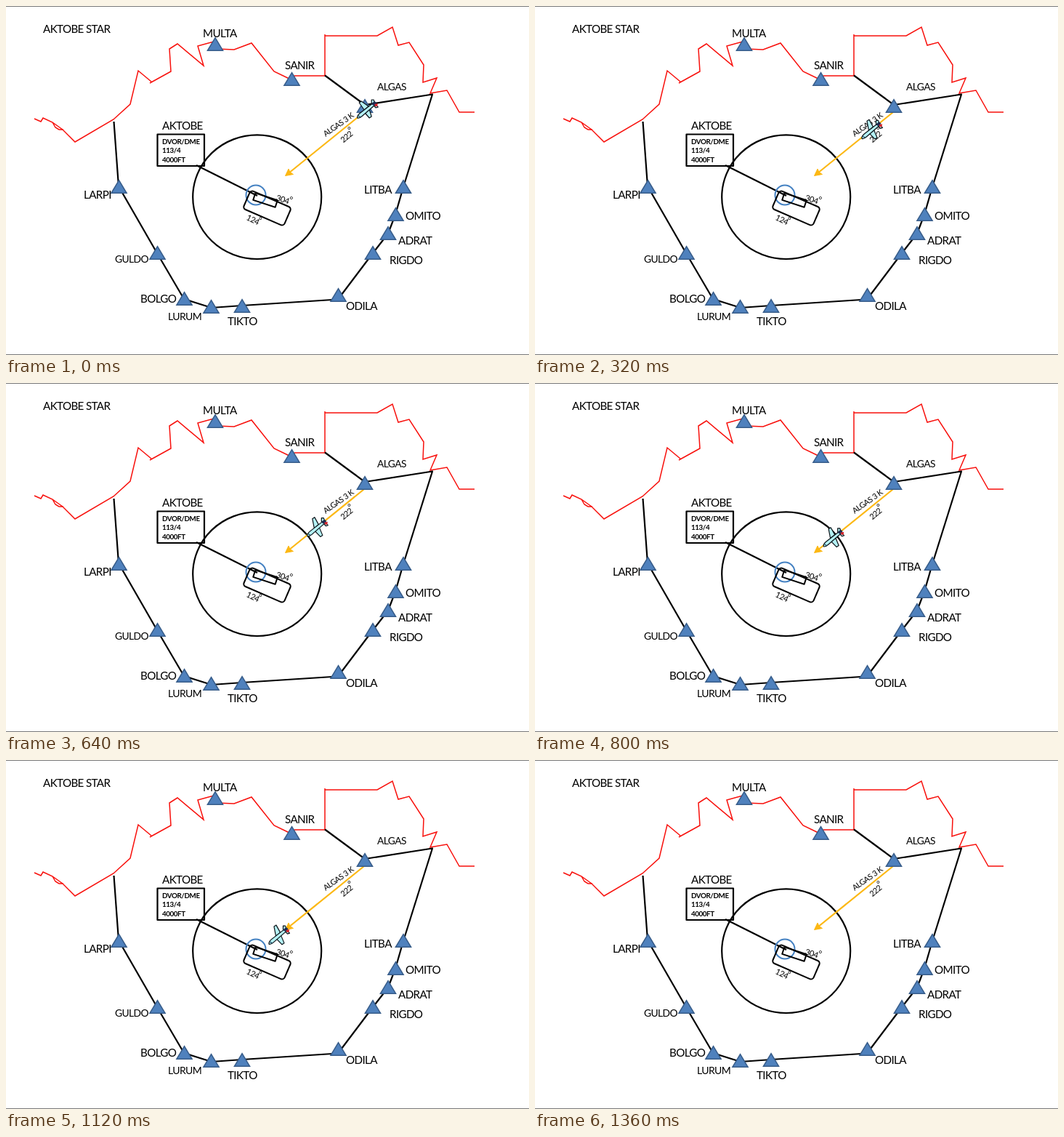
These frames come from a looping animation (720x480 px, 1.44 s). An HTML page:

```html
<!DOCTYPE html>
<html lang="en">
<head>
<meta charset="utf-8">
<title>Arrival chart</title>
<style>
html, body { margin: 0; width: 100%; height: 100%; overflow: hidden; background: #fff; }
svg { display: block; width: 100vw; height: 100vh; }
text { font-family: Lato, Inter, sans-serif; letter-spacing: -.042em; }
.line { fill: none; stroke: #000; stroke-width: 2.2; stroke-linejoin: round; }
.thin { stroke-width: 2; }
.red { fill: none; stroke: #f8100c; stroke-width: 1.5; }
.gold { fill: #fcb814; stroke: #fcb814; stroke-width: 2.2; }
.fix { fill: #4f81bd; stroke: #385d8a; stroke-width: 1.6; }
.skin { fill: #b4f1f4; stroke: #0b1218; stroke-width: 1.2; stroke-linejoin: round; }
</style>
</head>
<body>
<svg viewBox="0 0 720 480">
  <path d="M0 .5H720M0 479.5H720" stroke="#777"/>
  <path class="red" d="M39 155L48 159 51 154 64 160 68 167 73 170 79 170M64 160L78 170 95 187 148 156 171 135 182 89 200 104M198 106L227 90 225 59 236 52 272 82 264 55 286 49M290 59L314 60 338 51 369 90 392 101 397 96H439V39M439 41H511L532 29 540 54 555 50 575 81 574 105 593 99 584 120 607 116 624 146H645"/>
  <path class="line" d="M148.5 159L155 248 208 340 245 403 283 415 325 412 457 403.500 505 340 526 313 536 287 547 249 587 121.500 494 136 439 95.500"/>
  <ellipse class="line" cx="345.7" cy="262.7" rx="88.5" ry="85.3"/>
  <rect class="line" x="208.5" y="176.5" width="64.5" height="43.5"/>
  <path class="line" d="M262 219L346 261"/>
  <circle cx="344" cy="260" r="13.5" fill="none" stroke="#4481c2" stroke-width="2"/>
  <rect class="line thin" x="-30.5" y="-13.7" width="61" height="27.4" rx="4" transform="translate(359.5 278) rotate(23.5)"/>
  <rect class="line thin" x="-16" y="-5" width="32" height="10" transform="translate(357 267) rotate(18)"/>
  <path class="gold" d="M493 146L389 230"/>
  <path class="gold" style="stroke-width:1" d="M384.500 233.500L389 224 391 228.500 395.500 231.500Z"/>
  <g id="fixes"></g>
  <g id="labels"></g>
  <g id="plane">
    <path class="skin" id="wings"/>
    <path class="skin" d="M6 -7L6 -12 9 -12 11 -6 15 -2 12 -1Z"/>
    <path class="skin" d="M-13.5 13Q-14 10 -10 6.500L10 -9 12 -6 -7 10.500Q-11 14 -13.5 13Z"/>
    <path d="M6 -6L10 -10 13 -8 9 -4Z" fill="#1c2b52"/>
    <path d="M10 -6L14.5 -7 14 -3 11 -3Z" fill="#d3222a"/>
    <path d="M-12 10L-9 12" stroke="#24506b" stroke-width="1.3"/>
  </g>
</svg>
<script>
const NS = "http://www.w3.org/2000/svg";
const $ = id => document.getElementById(id);
const STEP = 80, STEPS = 18;

function add(parent, tag, attrs, text) {
  const el = document.createElementNS(NS, tag);
  for (const k in attrs) el.setAttribute(k, attrs[k]);
  if (text) el.textContent = text;
  $(parent).append(el);
}

function label(text, x, y, size = 15.2, turn = 0, weight = 400) {
  add("labels", "text", {
    transform: `translate(${x} ${y}) rotate(${turn})`,
    "font-size": size, "font-weight": weight
  }, text);
}

// waypoint name, triangle centre, label position, label size
const fixes = [
  ["MULTA", 288, 52, 271, 42.5], ["SANIR", 393.5, 100, 384, 87],
  ["ALGAS", 494, 137, 511, 116, 13.8], ["LARPI", 155.5, 248, 107, 264.5],
  ["LITBA", 547, 248, 493, 257.5], ["OMITO", 536.5, 286, 550, 294],
  ["ADRAT", 526, 312, 540, 327.5], ["RIGDO", 505, 339, 528, 354.5],
  ["ODILA", 457.5, 397, 468, 417.5], ["TIKTO", 325, 412, 305, 439],
  ["LURUM", 282.5, 413, 223, 432, 14], ["BOLGO", 245.5, 402, 185, 408],
  ["GULDO", 208.5, 339, 150, 353, 13.8]
];
for (const [name, x, y, lx, ly, size] of fixes) {
  add("fixes", "path", { class: "fix", d: `M${x} ${y - 8.3}l10.5 17.5h-21z` });
  label(name, lx, ly, size);
}

label("AKTOBE STAR", 51, 37);
label("AKTOBE", 215, 169.5);
["DVOR/DME", "113/4", "4000FT"].forEach((s, i) => label(s, 215, 190 + i * 12.3, 9.8, 0, 700));
label("ALGAS 3 K", 440, 180, 10.8, -35);
label("222", 464.5, 188.5, 11, -40);
label("°", 470, 175, 11.5);
label("304", 371, 267, 11.2, 18);
label("°", 390.5, 270.5, 11.5);
label("124", 330, 293.5, 11.2, 26);
label("°", 348, 299, 11.5);

function draw(ms) {
  const i = Math.floor(ms / STEP) % STEPS;
  // the wings rock once every six steps
  const roll = (1 - Math.cos(i * Math.PI / 3)) / 2;
  const plane = $("plane");
  plane.setAttribute("visibility", i < STEPS - 1 ? "visible" : "hidden");
  plane.setAttribute("transform", `translate(${497.2 - 8.8 * i + 2 * roll} ${141 + 7.08 * i})`);
  const ax = -11 + 6 * roll, ay = -9 - 4 * roll;
  const bx = 5 + 2 * roll, by = 12 + roll;
  $("wings").setAttribute("d",
    `M-4 2L${ax} ${ay + 1} ${ax + 3} ${ay - 1} 2 -3ZM-3 6L${bx - 2} ${by + 1} ${bx + 1} ${by - 1} 3 1Z`);
}

function tick() {
  draw(performance.now() % (STEP * STEPS));
  requestAnimationFrame(tick);
}
tick();
</script>
</body>
</html>
```
